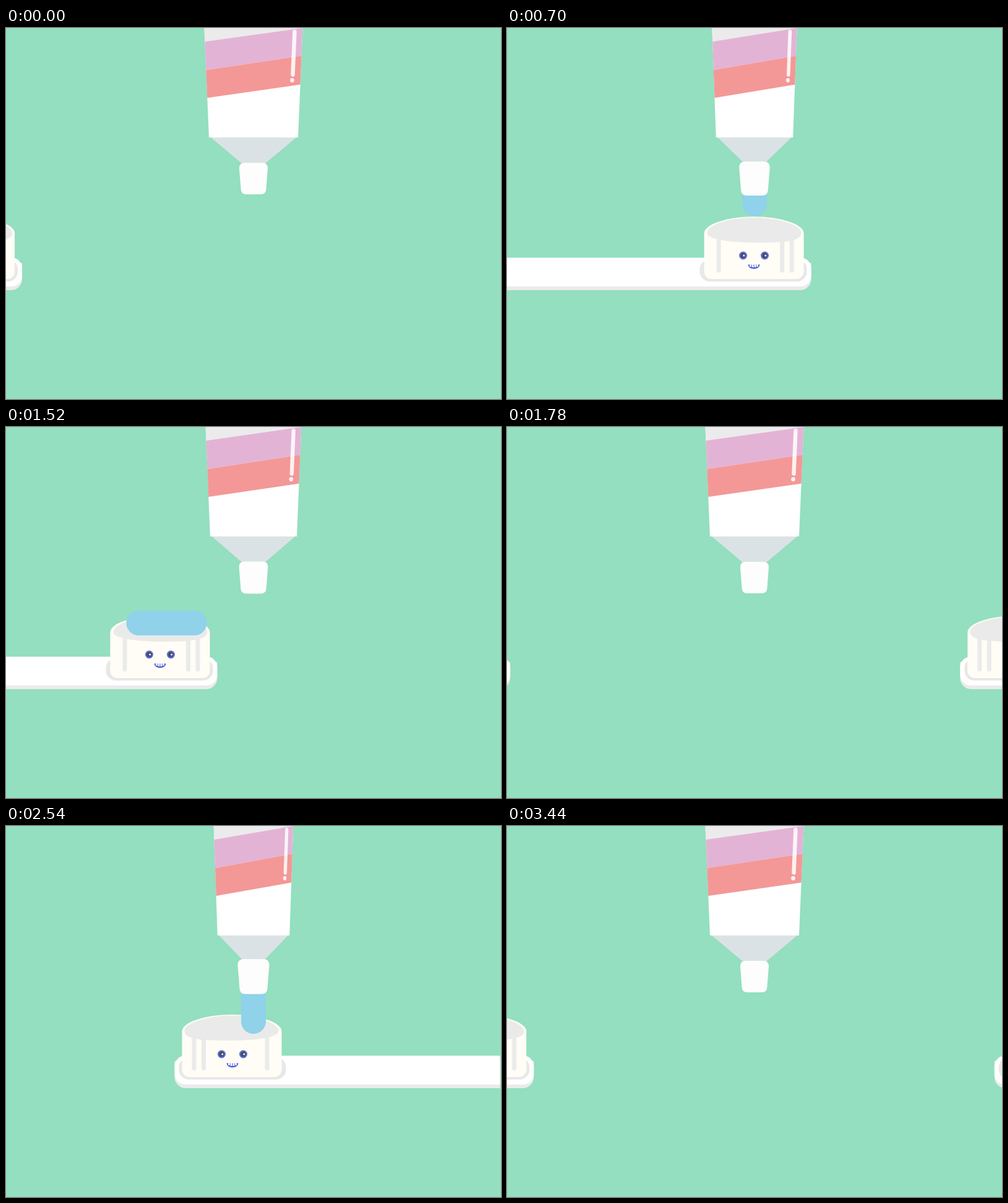
These frames come from a looping animation (800 by 600 pixels, 3460 ms). An HTML page:

```html
<!DOCTYPE html>
<html lang="en">
<head>
<meta charset="utf-8">
<title>Toothpaste</title>
<style>
  html, body { margin: 0; height: 100%; overflow: hidden; background: #93dfbf; }
  svg { display: block; width: 800px; height: 600px; }
  .paste { fill: none; stroke: #8fd2ea; stroke-width: 40; stroke-linecap: round; stroke-dasharray: 90 999; }
</style>
</head>
<body>
<svg viewBox="0 0 800 600">
  <defs>
    <!-- The tip of the brush is at x = 0, the handle runs to the left -->
    <g id="brush">
      <path fill="#ebebeb" d="M-526 380H0V406A18 18 0 0 1 -18 424H-526Z"/>
      <path fill="#fff" d="M-526 371.500H-17A17 17 0 0 1 0 388.500V401A17 17 0 0 1 -17 418H-526Z"/>
      <rect x="-180" y="374" width="173" height="36" rx="16" fill="#e8e8e8"/>
      <path fill="#fffdf5" d="M-173 332C-173 317 -134 305 -92.500 305S-12 317 -12 332V394A12 12 0 0 1 -24 406H-161A12 12 0 0 1 -173 394Z"/>
      <path stroke="#ebebeb" stroke-width="7" stroke-linecap="round" d="M-149.500 335V392M-47 335V392M-31.500 335V392"/>
      <path fill="#eaeaea" d="M-168 332C-168 317 -128 306.500 -92.500 306.500S-16 317 -16 332S-57 347 -92.500 347S-168 342 -168 332Z"/>
    </g>
    <g id="eye">
      <circle r="6.500" fill="#5f6dd3"/>
      <circle r="4.300" fill="#434c68"/>
      <circle cx="1.200" r="1.500" fill="#fff"/>
    </g>
    <g id="face">
      <use href="#eye" x="-17.500" y="368"/>
      <use href="#eye" x="17.500" y="368"/>
      <path fill="#5463d6" d="M-9.500 382.500H9.500C9 387 5 389.500 0 389.500S-9 387 -9.500 382.500Z"/>
      <path stroke="#fff" stroke-width="2.600" d="M-5.500 382V386M-1.900 382V387M1.900 382V387M5.500 382V386"/>
    </g>
  </defs>

  <g><use class="brush" href="#brush"/><path class="paste"/></g>
  <use class="face" href="#face"/>
  <g transform="translate(800) scale(-1 1)"><use class="brush" href="#brush"/></g>
  <use class="face" href="#face"/>
  <g transform="translate(800) scale(-1 1)"><path class="paste"/></g>

  <g id="tube">
    <path fill="#dbe2e5" d="M-69 177H69L19 219H-19Z"/>
    <path fill="#fff" d="M-79.500 0H79.500L72 177H-72Z"/>
    <path fill="#ebebeb" d="M-79.500 0H79L-78.600 22Z"/>
    <path fill="#e3b3d5" d="M-78.600 22L79.500 0L77.600 45L-76.700 68Z"/>
    <path fill="#f39897" d="M-76.700 68L77.600 45L75.600 91.500L-74.700 113Z"/>
    <path stroke="#fff" stroke-opacity=".85" stroke-width="6.500" stroke-linecap="round" d="M66.500 6L63.500 75.500"/>
    <circle cx="62.500" cy="84.500" r="3.400" fill="#fff" fill-opacity=".85"/>
  </g>
  <path id="cap" fill="#fdfdfd" d="M-14 -25.500H14Q23.500 -25.500 23 -16L20.300 18Q19.500 25.500 12 25.500H-12Q-19.500 25.500 -20.300 18L-23 -16Q-23.500 -25.500 -14 -25.500Z"/>
</svg>
<script>
const LOOP = 3460, RIGHT_DELAY = 1688, RETURN_DELAY = 3397, REACH = 528;
const all = selector => [...document.querySelectorAll(selector)];
const brushes = all('.brush'), pastes = all('.paste'), faces = all('.face');
const tube = document.getElementById('tube'), cap = document.getElementById('cap');

const progress = (t, from, to) => Math.min(1, Math.max(0, (t - from) / (to - from)));
const sineInOut = p => (1 - Math.cos(Math.PI * p)) / 2;
const quadOut = p => p * (2 - p);

// How far the brush has been pulled back from its furthest reach
function pullBack(t, [start, square, quartic]) {
  const u = Math.max(0, (t - start) / 900);
  return square * u ** 2 + quartic * u ** 4;
}

const press = t => quadOut(progress(t, 545, 885));
const squeeze = t => 0.193 * (press(t) - sineInOut(progress(t, 885, 1725)));

function drawSide(i, t, exit) {
  const back = pullBack(t, exit);
  const reach = REACH * sineInOut(progress(t, -144, 873)) - back;
  brushes[i].setAttribute('transform', `translate(${reach})`);
  faces[i].setAttribute('transform', i
    ? `translate(${800 - reach + 93.5} 1)`
    : `translate(${reach - 92.5})`);

  // The paste drops from the nozzle, bends, and is dragged along by the brush
  const drag = Math.max(0, back - 1), r = Math.min(40, drag);
  const tipY = 205 + 112 * press(t);
  pastes[i].setAttribute('d',
    `M${400 - drag} ${tipY}H${400 - r}A${r} ${r} 0 0 0 400 ${tipY - r}V205`);
}

function draw(time) {
  const t = time % LOOP;
  const left = t > 2500 ? t - RETURN_DELAY : t;
  const right = t < 1630 ? -144 : t - RIGHT_DELAY;
  drawSide(0, left, [880, 210, 311]);
  drawSide(1, right, [862, 95, 440]);

  const q = squeeze(left) + squeeze(right);
  tube.setAttribute('transform', `translate(400) scale(${1 - q} 1)`);
  cap.setAttribute('transform', `translate(400 243.5) scale(${1 + 0.55 * q})`);
}

const begin = performance.now();
function tick() {
  draw(performance.now() - begin);
  requestAnimationFrame(tick);
}
tick();
</script>
</body>
</html>
```
